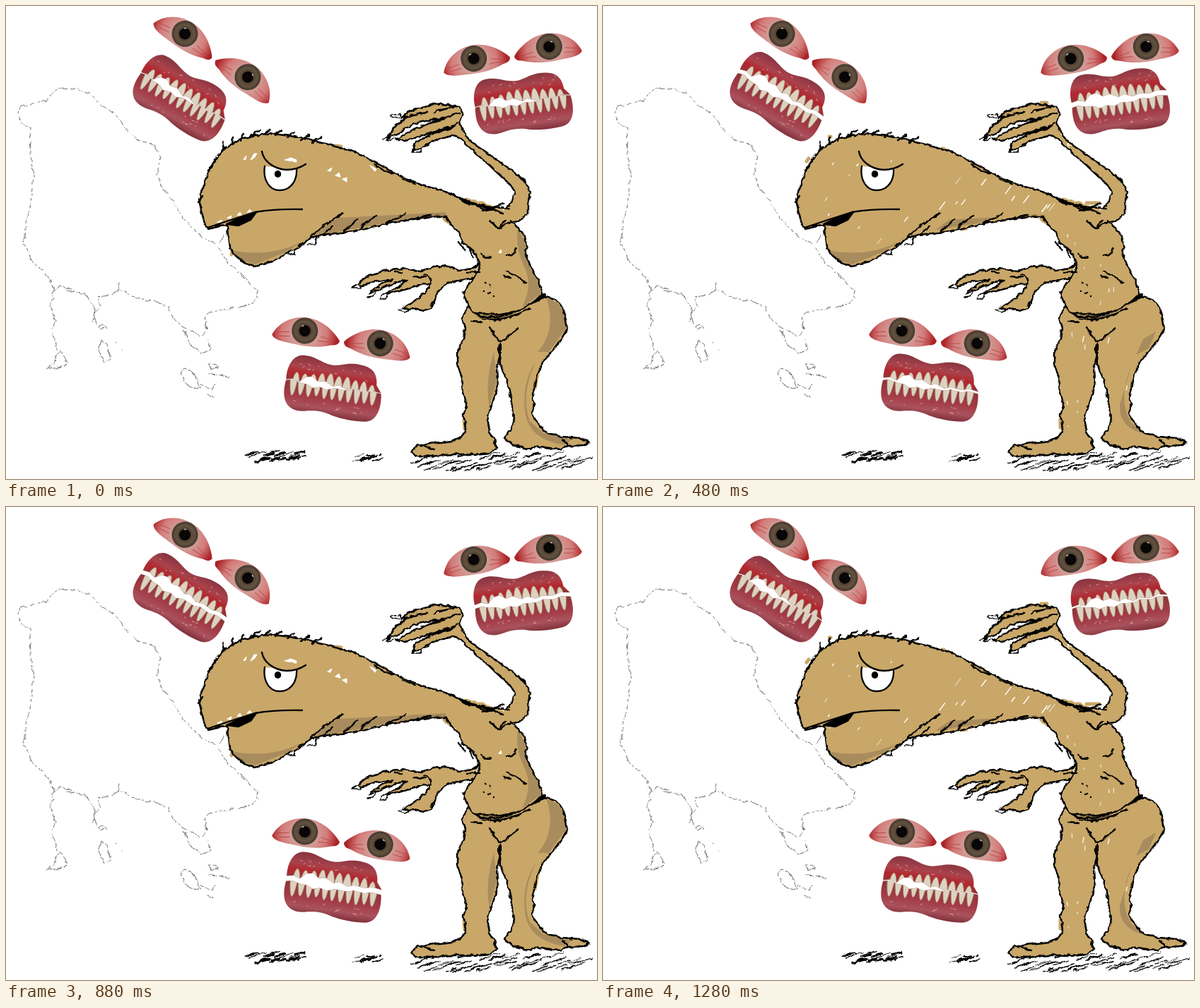
An HTML page that plays this animation: 836x670 px, repeating every 1320 ms.

```html
<!DOCTYPE html>
<html lang="en">
<head>
<meta charset="utf-8">
<title>Chattering teeth</title>
<style>
html, body { margin: 0; width: 100%; height: 100%; overflow: hidden; background: #fff }
svg { display: block; width: 836px; height: 670px }
path { stroke-linecap: round; stroke-linejoin: round }
</style>
</head>
<body>
<svg viewBox="0 0 836 670" fill="none">
<defs>
  <filter id="rough" filterUnits="userSpaceOnUse" x="0" y="0" width="836" height="670">
    <feTurbulence baseFrequency=".07" numOctaves="2" seed="4"/>
    <feDisplacementMap in="SourceGraphic" scale="5" xChannelSelector="R" yChannelSelector="G"/>
  </filter>
  <radialGradient id="sclera" gradientUnits="userSpaceOnUse" cx="0" cy="4" r="52">
    <stop offset=".35" stop-color="#d29a95"/><stop offset=".62" stop-color="#d37b79"/><stop offset=".9" stop-color="#ab2226"/>
  </radialGradient>
  <radialGradient id="iris">
    <stop offset=".35" stop-color="#493a2e"/><stop offset=".7" stop-color="#64533f"/><stop offset="1" stop-color="#41372f"/>
  </radialGradient>
  <linearGradient id="gumTop" x2="0" y2="1">
    <stop stop-color="#86343f"/><stop offset=".4" stop-color="#a9434c"/><stop offset=".65" stop-color="#b3262d"/><stop offset="1" stop-color="#8a3a38"/>
  </linearGradient>
  <linearGradient id="gumBottom" x2="0" y2="1">
    <stop stop-color="#8a3436"/><stop offset=".45" stop-color="#a33a45"/><stop offset=".75" stop-color="#a9525d"/><stop offset="1" stop-color="#7f303a"/>
  </linearGradient>
  <path id="upper" d="M-67-4C-69-22-62-40-48-41C-30-43-20-33-4-33C8-33 15-40 33-39C50-38 60-32 61-13L69-3 55-5 45-2 30-4 20-1 8-6 0-3-12-9-22-7-30-13-40-11-48-3-58-6Z"/>
  <path id="lower" d="M-67-3L-58-5-48-2-36-1-28 3-18 0-8 3 2-1 20 0 30-3 45-1 55-4 69-2C72 15 70 37 52 40C35 42 20 41 5 38C-10 33-22 34-35 37C-52 40-72 34-67-3Z"/>
  <clipPath id="upperClip"><use href="#upper"/></clipPath>
  <clipPath id="lowerClip"><use href="#lower"/></clipPath>
  <g id="eye">
    <path fill="url(#sclera)" d="M-45 13C-38-8-17-19 2-19C24-19 42-5 51 6C50 13 44 13 40 14C25 20 10 22-8 21C-25 20-40 21-45 13Z"/>
    <path stroke="#b54444" stroke-width=".8" d="M-38 8l16-3M-34 13l14-2M44 8l-20-4M38 10l-17 1"/>
    <circle r="18.5" fill="url(#iris)"/><circle r="8" fill="#080606"/>
    <path stroke="#c9c4bd" stroke-width="1.5" d="M-5-6l2-1"/>
  </g>
  <g id="body">
    <path d="M622 297L600 297 570 302 545 306 515 312 490 318 465 321 445 323 430 327 420 335 405 345 395 350 375 361 350 367 335 362 323 352 315 341 313 325 312 309 300 310 285 314 279 307 275 292 272 278 277 262 280 247 286 231 297 213 310 199 328 188 352 182 375 179 400 182 425 187 450 193 475 200 500 209 525 222 548 235 570 246 595 254 620 261 645 272 668 281 690 287"/>
    <path d="M708 284L715 273 719 262 712 252 697 238 680 222 664 208 652 197 641 186 628 182 608 188 590 198 574 204 578 191 600 180 622 174 634 168 612 174 590 181 565 189 549 189 572 176 598 164 618 159 600 160 575 166 555 179 538 186 550 168 572 153 594 150 575 153 558 158 568 149 588 142 604 137 625 139 640 141 645 150 640 165 650 184 662 195 680 207 700 221 718 235 733 246 740 263 737 280 737 294 722 304 705 308 695 315 683 302"/>
    <path d="M712 303L722 312 733 325 736 338 733 350 740 362 744 375 751 385 755 396 757 406 746 417 730 427 712 435 690 439 670 439 658 432 651 420 646 405 652 394 662 383 668 370 665 352 655 341 645 334 638 318 629 309 622 298"/>
    <path d="M757 408L775 414 785 424 790 440 793 455 785 468 778 480 768 490 757 505 750 520 746 540 743 555 747 565 742 575 746 585 755 595 765 605 785 609 810 611 824 616 818 621 800 622 780 627 755 623 735 626 715 620 705 610 712 600 717 585 714 560 711 543 706 525 697 507 696 485 697 478 697 492 693 510 694 530 690 555 683 570 679 585 682 600 690 612 693 625 685 632 660 634 630 634 600 637 580 636 573 629 582 622 605 618 630 615 645 608 650 595 646 580 650 565 645 545 643 525 637 508 637 490 646 470 648 455 644 440 652 426"/>
    <path d="M668 363L663 369 640 373 622 366 603 369 585 374 560 371 535 374 512 380 500 388 494 397 507 394 524 389 547 386 528 394 515 402 512 408 526 401 547 392 567 388 550 399 536 407 528 412 546 405 569 398 590 392 598 393 592 405 580 414 570 420 558 428 575 427 590 430 600 427 606 411 614 399 626 390 645 387 660 384"/>
  </g>
</defs>

<g id="ghost" stroke="#333" stroke-width=".7" filter="url(#rough)">
  <path stroke-dasharray="7 4 3 3 11 5" d="M68 401L62 388 50 373 36 360 24 335 27 305 34 275 38 240 34 210 33 172 20 165 16 153 20 142 38 136 57 133 63 124 75 115 100 116 120 125 133 140 152 150 165 170 185 188 208 195 217 213 212 238 222 260 235 275 250 300 275 325 297 338 311 360 335 384 356 403 353 413 345 422 315 428 290 432 280 440 283 457 275 466 248 452 235 440 228 425 210 417 190 415 175 408 160 401 148 407 128 411 133 424 122 434 126 449"/>
  <path stroke-dasharray="12 3 6 2" d="M92 399l-18-2-10 8 2 8-5 10 8 22-4 10M85 402l26 5 13 20-2 20M130 453l5-3 5 4-7 4zM160 392l-4 12M64 461l5 17 1 8M76 487l-7 8-3 12-11 5 12 0 14-3 5-5-6-10zM133 472l-4 15 9 16 8-4-5-20zM143 488l4 7M154 474l2 1M163 486l1 2M250 457l9 20 17 13 12-3-4-17M250 512l-4 8 11 17 17 4-4-12-9-14zM284 505l15 4-10 6zM285 520l17 1 13 4M275 535l15 7 4-6M285 549l7 5M335 381l7 8M307 324l-5 9"/>
</g>
<g fill="#c9a768" filter="url(#rough)">
  <use href="#body"/>
  <path d="M615 300L650 270 700 285 722 312 640 318Z"/>
</g>
<g id="variants"></g>
<g stroke="#000" stroke-width="2.4" filter="url(#rough)">
  <use href="#body"/>
  <path d="M307 202l-2-11M318 195l1-11M331 189l4-10M350 184q1-8 8-9M366 181q1-6 7-7M380 182q2-7 9-7M397 184q2-6 10-6M415 190q4-6 12-8M432 193q5-7 14-8M286 228l9-9M271 271l4 12"/>
  <path d="M426 329l20-18 29-19M446 323l14-12M476 318l20-17M500 313l22-18M538 306l26-13M565 302l35-8M520 223l14 9 12 4M560 244l18 8M622 262l31 17 57 7M645 273l33 15 25-5M663 279l38 13M672 288l31-9M683 302l12 12 10-12M640 333l8 13M655 341l5 15"/>
  <path d="M670 349q6 8 15 5M706 352q12 0 15-9M650 376l18 0M708 375l13 5 13 12M704 382l8 1M676 393l1 0M683 395l1 0M674 402l1 0M682 405l1 0M688 411l1 0M663 434q35 5 63-5M672 442q38 2 68-15M690 445l30-9M656 446l15 1M682 453l16 22 25-19M698 480l-1 24"/>
  <path fill="#000" d="M743 419l17-13 2 5z"/>
  <path d="M631 142q-18 2-27 8M640 151q-17 4-28 7M637 165l-13 10M548 376l12 1M589 379q12 2 10 14M574 382l18 1M590 623l14 4M785 613l9 7"/>
  <path fill="#fff" stroke-width="1.7" d="M558 156l-12 2-4-4 13-2zM539 183l-7 4 10-7M549 187l-13 2 9-7M576 202l10-1-1 5-12 0zM495 393l-8 5 13 0M512 406l10-5-4 9-9 1M529 409l10-3-3 7-8 1M560 427l11 2-9 3-8-3M398 351l8 0 0-8M425 337l12-1 1-10"/>
</g>
<g stroke="#000" stroke-width="2.3">
  <path fill="#fff" d="M366 227C363 247 373 261 387 261C403 261 412 247 411 231"/>
  <path fill="#c9a768" stroke="none" d="M364 220Q388 236 412 229L412 222 370 214Z"/>
  <path fill="#000" d="M312 309L335 298 354 292 346 303 329 311Z"/>
  <path d="M362 206C364 219 378 231 397 232Q412 232 424 224M272 278l6-9M285 314L318 303 352 292Q382 287 419 288"/>
</g>
<ellipse cx="384.5" cy="238" rx="4.7" ry="5" fill="#000"/>
<g id="shadows" stroke="#000" filter="url(#rough)"></g>
<g id="faces"></g>
</svg>
<script>
const $ = id => document.getElementById(id);

let seed = 7;
const rnd = (a, b) => {
  seed = (seed * 16807) % 2147483647;
  return a + (b - a) * seed / 2147483647;
};
const stroke = (x, y, dx, dy, w) =>
  `<path d="M${x.toFixed(1)} ${y.toFixed(1)}l${dx.toFixed(1)} ${dy.toFixed(1)}" stroke-width="${w.toFixed(1)}"/>`;
const repeat = (n, make) => Array.from({ length: n }, (_, i) => make(i)).join('');

// White gaps left by the crayon: slanted on the head, upright on the body.
function gaps(head, body) {
  const onHead = () => {
    const x = rnd(292, 640);
    const top = x < 375 ? 190 + (375 - x) * .45 : 190 + (x - 375) * .33;
    const bottom = x < 320 ? 298 : x < 430 ? 340 : 312 - (x - 430) * .1;
    const len = rnd(2, x > 440 ? 11 : 8);
    return stroke(x, rnd(top + 8, bottom), len * .75, -len, rnd(.7, 1.7));
  };
  const onBody = i => {
    const [x, y, w, h] = [[655, 315, 75, 110], [650, 455, 38, 150], [705, 455, 42, 130], [655, 195, 8, 10]][i % 4];
    return stroke(x + rnd(0, w), y + rnd(0, h), rnd(-1, 2), -rnd(2, 8), rnd(.6, 1.3));
  };
  return `<g stroke="#fff">${repeat(head, onHead)}${repeat(body, onBody)}</g>`;
}

const shade = d => `<path fill="#a98c5d" d="${d}"/>`;
const spill = d => `<path stroke="#c9a768" stroke-width="5" d="${d}"/>`;
const chin = shade('M318 346Q355 353 385 346T430 324L400 347 352 366 330 359Z');
const variants = {
  A: chin
    + shade('M430 324L470 300 550 296 622 292 622 297 545 306 465 321Z')
    + shade('M724 315L736 338 734 350 756 398 756 408 730 427Q746 395 733 369T724 315Z')
    + shade('M764 412L786 424 793 455 768 490 752 490Q780 458 764 412Z')
    + shade('M690 490Q677 535 684 568L694 530ZM749 505Q727 550 741 588L760 605 800 614 790 622Q738 614 734 573T749 505Z')
    + spill('M753 517l-5 24M648 585l1 14M322 340l-3 12M467 198l7 1')
    + '<path fill="#fff" stroke="#fff" d="M336 217l4-5-1 5zM346 218l5-9 4 0-3 5zM390 223l4-5 9-3 8 3-1 6-5-5-9 2zM455 233l6-4-2 5zM466 240l5-4 2 6zM476 245l6-2 0 6zM515 226l9 5-2 3zM697 349l3-4 1 4zM299 306l6-3 0 4zM313 300l6-3-1 4zM327 296l4-4 2 4zM341 292l4-4 2 3zM283 229l7-9 3 2z"/>',
  B: chin
    + shade('M476 318l24-18 45-5-18 14zM769 426L789 440 792 455 770 488 750 490Q773 464 769 426Z')
    + spill('M388 354l28-13M500 208l18 10M690 222l20 12M790 430l2 20M645 588l2 8')
    + gaps(175, 130),
  C: chin
    + shade('M470 317l20-14 70-4-30 9zM764 472l18-11-10 24-18 9zM748 508Q727 556 747 590L770 607Q729 599 731 565Z')
    + spill('M320 185l2 0M480 202l2 0M291 216l-3 4M620 137l8 0M684 279l18 0M647 585l0 12M790 446l2 7M508 316l6-1')
    + gaps(24, 26)
};
for (const key in variants)
  $('variants').innerHTML += `<g id="variant${key}">${variants[key]}</g>`;

// Scribbled ground shadow, rising to the right.
const hatch = (n, x0, x1, y0, y1, len, weight) => repeat(n, i => {
  const x = x0 + (x1 - x0) * i / n, l = rnd(len * .4, len);
  return stroke(x, rnd(y0, y1), l, -l * .3, rnd(.6, weight));
});
$('shadows').innerHTML = hatch(22, 337, 412, 630, 646, 20, 3)
  + hatch(9, 490, 522, 636, 644, 16, 2.2)
  + hatch(56, 573, 805, 637, 657, 28, 1.9);

// The picture advances in 20 steps on a 40 ms clock: every 5 ticks hold 3 steps.
const LOOP = 1320, TICK = 40, STEPS = 20;
const colouring = 'AABC';

// Jaw height; a skew below 1 opens faster than it closes.
const wave = (step, period, skew) =>
  6.3 * Math.sin(Math.PI * (step % period / period) ** skew) ** 2;

// Each face: eye centre and tilt, mouth centre and tilt, and how its jaw moves.
const faces = [
  { eyes: [297.5, 70, 34.6], mouth: [248, 130, 29], period: STEPS, skew: 1 },
  { eyes: [715, 66, -9], mouth: [730.5, 138, -8], period: STEPS / 4, skew: .75 },
  { eyes: [476, 469, 9.5], mouth: [462, 542, 8], period: STEPS / 2, skew: .62 }
];
const place = ([x, y, angle]) => `translate(${x} ${y}) rotate(${angle})`;
const tooth = (x, w, root, edge) =>
  `<path d="M${x - w} ${edge}Q${x - w * .6} ${root} ${x} ${root}Q${x + w * .6} ${root} ${x + w} ${edge}Z"/>`;
const upperTeeth = repeat(10, i => {
  const x = -53 + i * 12;
  return tooth(x, 5.6 + 1.4 * Math.cos(x / 40), -14 - 6 * Math.cos(x / 38) + rnd(-2, 2), 2);
});
const lowerTeeth = repeat(11, i => tooth(-56 + i * 11.4, 5.4, 15 + rnd(-1, 3), -7));
const shine = (y0, y1) => `<g stroke="#d99a9b">${repeat(12, () =>
  stroke(rnd(-55, 54), rnd(y0, y1), rnd(1, 4), rnd(-2, 2), .9))}</g>`;
const jaw = (name, gum, teeth, gloss) => `<use href="#${name}" fill="url(#${gum})"/>
  <g clip-path="url(#${name}Clip)"><g fill="#dcd2bf" stroke="#9c7564" stroke-width=".8">${teeth}</g>${gloss}</g>`;

$('faces').innerHTML = faces.map(f => `
  <g transform="${place(f.eyes)}">
    <use href="#eye" x="-54"/><use href="#eye" transform="translate(54) scale(-1 1)"/>
  </g>
  <g transform="${place(f.mouth)}">
    ${jaw('lower', 'gumBottom', lowerTeeth, shine(20, 31))}
    <g class="jaw">${jaw('upper', 'gumTop', upperTeeth, shine(-32, -18))}</g>
  </g>`).join('');
const jaws = document.querySelectorAll('.jaw');

function draw(now) {
  const tick = Math.floor(now % LOOP / TICK);
  const step = Math.max(0, Math.ceil(tick * 3 / 5) - 1);
  for (const key in variants)
    $('variant' + key).style.display = key === colouring[step % 4] ? '' : 'none';
  faces.forEach((f, i) =>
    jaws[i].setAttribute('transform', `translate(0 ${-wave(step, f.period, f.skew)})`));
}
const start = performance.now();
function loop() {
  draw(performance.now() - start);
  requestAnimationFrame(loop);
}
loop();
</script>
</body>
</html>
```
